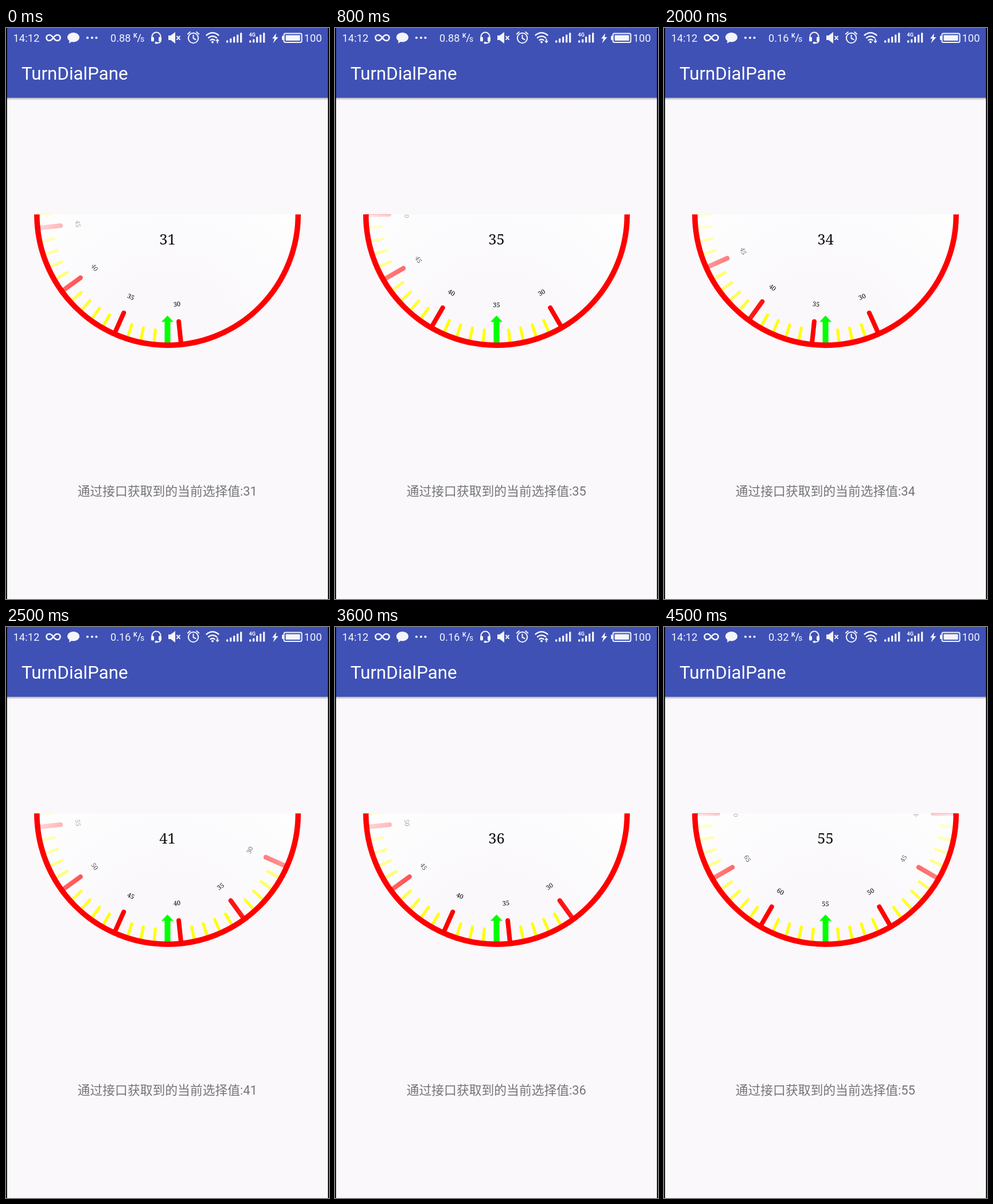
These frames come from a looping animation (563 px wide and 994 px high, 5100 ms). An HTML page:

```html
<!DOCTYPE html>
<html lang="zh-CN">
<head>
<meta charset="utf-8">
<title>TurnDialPane</title>
<style>
  html, body { margin: 0; width: 100%; height: 100%; overflow: hidden; background: #faf8fb; }
  svg { display: block; width: 100%; height: 100%; }
  text { font-family: Roboto, "Noto Sans CJK SC", "Noto Sans CJK", sans-serif; }
  .dial text { font-family: "Noto Serif", serif; text-anchor: middle; fill: #000; }
  .status { fill: #f4f5fb; stroke: none; font-size: 18.4px; }
  .line { fill: none; stroke: #f4f5fb; stroke-width: 2; stroke-linecap: round; stroke-linejoin: round; }
  .major { stroke: #f00; stroke-width: 8; stroke-linecap: round; }
  .minor { stroke: #ff0; stroke-width: 5; stroke-linecap: round; }
</style>
</head>
<body>
<svg viewBox="0 0 563 994">
  <defs>
    <clipPath id="half"><rect x="40" y="324.5" width="483" height="240"/></clipPath>
    <radialGradient id="fade" gradientUnits="userSpaceOnUse" cx="281.5" cy="547" r="335">
      <stop offset=".343" stop-color="#fff" stop-opacity="0"/>
      <stop offset="1" stop-color="#fff"/>
    </radialGradient>
    <linearGradient id="shadow" x2="0" y2="1">
      <stop stop-color="#000" stop-opacity=".3"/>
      <stop offset="1" stop-color="#000" stop-opacity="0"/>
    </linearGradient>
  </defs>

  <rect width="563" height="994" fill="#faf8fb"/>
  <rect y="121" width="563" height="5" fill="url(#shadow)"/>
  <rect width="563" height="121.5" fill="#3f51b5"/>
  <text x="27" y="90" font-size="31.3" fill="#fff">TurnDialPane</text>

  <g class="status">
    <text x="12.5" y="24">14:12</text>
    <path class="line" style="stroke-width:2.7" d="M82.500 17C79 12.500 77 12 75.500 12a5 5 0 0 0 0 10C79 22 80 20 82.500 17S86 12 89.500 12a5 5 0 0 1 0 10C87 22 85 20.500 82.500 17"/>
    <path d="M117.500 8c6 0 10.500 3.700 10.500 8.300s-4.500 8.200-10.500 8.200q-1.500 0-3-.4l-4.500 2.700.5-4.500C108.300 20.800 107 18.700 107 16.300 107 11.700 111.500 8 117.500 8z"/>
    <circle cx="142" cy="17" r="2.100"/><circle cx="150" cy="17" r="2.100"/><circle cx="157.500" cy="17" r="2.100"/>
    <text id="speed" x="182" y="24" font-size="18.2">0.88</text>
    <text x="222" y="17" font-size="10.500" font-weight="700">K</text>
    <path class="line" style="stroke-width:1.500" d="M234.500 11l-5 13"/>
    <text x="234" y="24" font-size="14">s</text>

    <path class="line" d="M254.500 18v-3a7.500 7.500 0 0 1 15 0v3M269.500 22q0 4-6 4.200"/>
    <rect x="253" y="15.500" width="5" height="8" rx="1.800"/>
    <rect x="266" y="15.500" width="5" height="8" rx="1.800"/>
    <rect x="259.500" y="24" width="5" height="3.500" rx="1.500"/>

    <path d="M283 13h4l8-6v20l-8-6h-4z"/>
    <path class="line" d="M298 14.500l5 5.500M303 14.500l-5 5.500"/>

    <circle class="line" cx="326.500" cy="17.500" r="8.700"/>
    <path class="line" d="M326.500 12.500v5.500l4 2M316.800 10.500l4-3.500M336.200 10.500l-4-3.500"/>

    <path class="line" style="stroke-width:2.400" d="M349.500 12.500q10.500-8.500 21 0M353 17q7-5.500 14 0M356.500 21q3.500-2.500 7 0"/>
    <circle cx="360" cy="24.500" r="2"/>
    <path id="net" d="M368.500 18.500l3.500 4h-2.500v4h-2v-4H365z"/>

    <g id="bars"></g>
    <text x="423.500" y="15" font-size="9" font-weight="700">4G</text>
    <path d="M471 9l-7 9.500h4l-2.500 8L474.500 16h-4.500z"/>
    <rect class="line" x="484.500" y="9.500" width="31" height="15.500" rx="2.500"/>
    <rect x="487.500" y="12.500" width="25" height="9.500"/>
    <rect x="481" y="13.500" width="3" height="7.500" rx="1"/>
    <text x="519.500" y="24">100</text>
  </g>

  <g class="dial" clip-path="url(#half)">
    <g id="scale"></g>
    <circle cx="281.5" cy="324.5" r="223" fill="url(#fade)"/>
    <path d="M281.5 500.500L292 511.500H286.500V549H276.500V511.500H271z" fill="#0f0"/>
    <circle cx="281.5" cy="324.5" r="227.700" fill="none" stroke="#f00" stroke-width="9.500"/>
    <text id="big" x="281.500" y="376.500" font-size="25.500" style="fill:#111">31</text>
  </g>

  <text id="caption" x="281.300" y="814" font-size="21.800" text-anchor="middle" fill="#757575"></text>
  <rect width="1.800" height="994"/>
  <rect x="561.200" width="1.800" height="994"/>
</svg>
<script>
  const LOOP = 5100, STEP = 100, CX = 281.5, CY = 324.5, DEG = 6;
  // Selected value for each step; the last one holds to the end of the loop.
  const values = [
    31, 30, 30, 31, 32, 32, 33, 34, 35, 36,
    37, 36, 35, 34, 34, 34, 33, 32, 31, 31,
    34, 36, 37, 37, 39, 41, 43, 44, 44, 39,
    36, 34, 33, 33, 33, 34, 36, 40, 45, 50,
    53, 55, 57, 56, 56, 55
  ];
  const $ = id => document.getElementById(id);

  function add(parent, tag, attrs, text) {
    const el = document.createElementNS('http://www.w3.org/2000/svg', tag);
    for (const key in attrs) el.setAttribute(key, attrs[key]);
    if (text !== undefined) el.textContent = text;
    parent.appendChild(el);
  }

  for (let n = 30; n < 75; n++) {
    const major = n % 5 === 0;
    const transform = `rotate(${(n - 30) * DEG} ${CX} ${CY})`;
    add($('scale'), 'line', {
      class: major ? 'major' : 'minor', transform,
      x1: CX, x2: CX, y1: CY + (major ? 187.5 : 202), y2: CY + 225
    });
    if (major) add($('scale'), 'text', { x: CX, y: CY + 161, 'font-size': 11, transform }, n);
  }

  for (let i = 0; i < 5; i++) {
    const h = 4 + i * 3.3;
    add($('bars'), 'rect', { x: 384 + i * 6, y: 25.5 - h, width: 3.3, height: h, rx: 1 });
    const h2 = i < 2 ? 4 + i * 2 : h;
    add($('bars'), 'rect', { x: 424 + i * 6, y: 25.5 - h2, width: 3.3, height: h2, rx: 1 });
  }

  function draw(t) {
    const v = values[Math.min(Math.floor(t / STEP), values.length - 1)];
    $('scale').setAttribute('transform', `rotate(${(30 - v) * DEG} ${CX} ${CY})`);
    $('big').textContent = v;
    $('caption').textContent = '通过接口获取到的当前选择值:' + v;
    $('speed').textContent = t < 1000 ? '0.88' : t < 4000 ? '0.16' : '0.32';
    const up = t < 100 || (t >= 2100 && t < 2500) || (t >= 3100 && t < 3700);
    $('net').setAttribute('transform', up ? '' : 'matrix(1 0 0 -1 0 45)');
  }

  const start = performance.now();
  function tick(now) {
    draw(Math.max(0, now - start) % LOOP);
    requestAnimationFrame(tick);
  }
  draw(0);
  requestAnimationFrame(tick);
</script>
</body>
</html>
```
